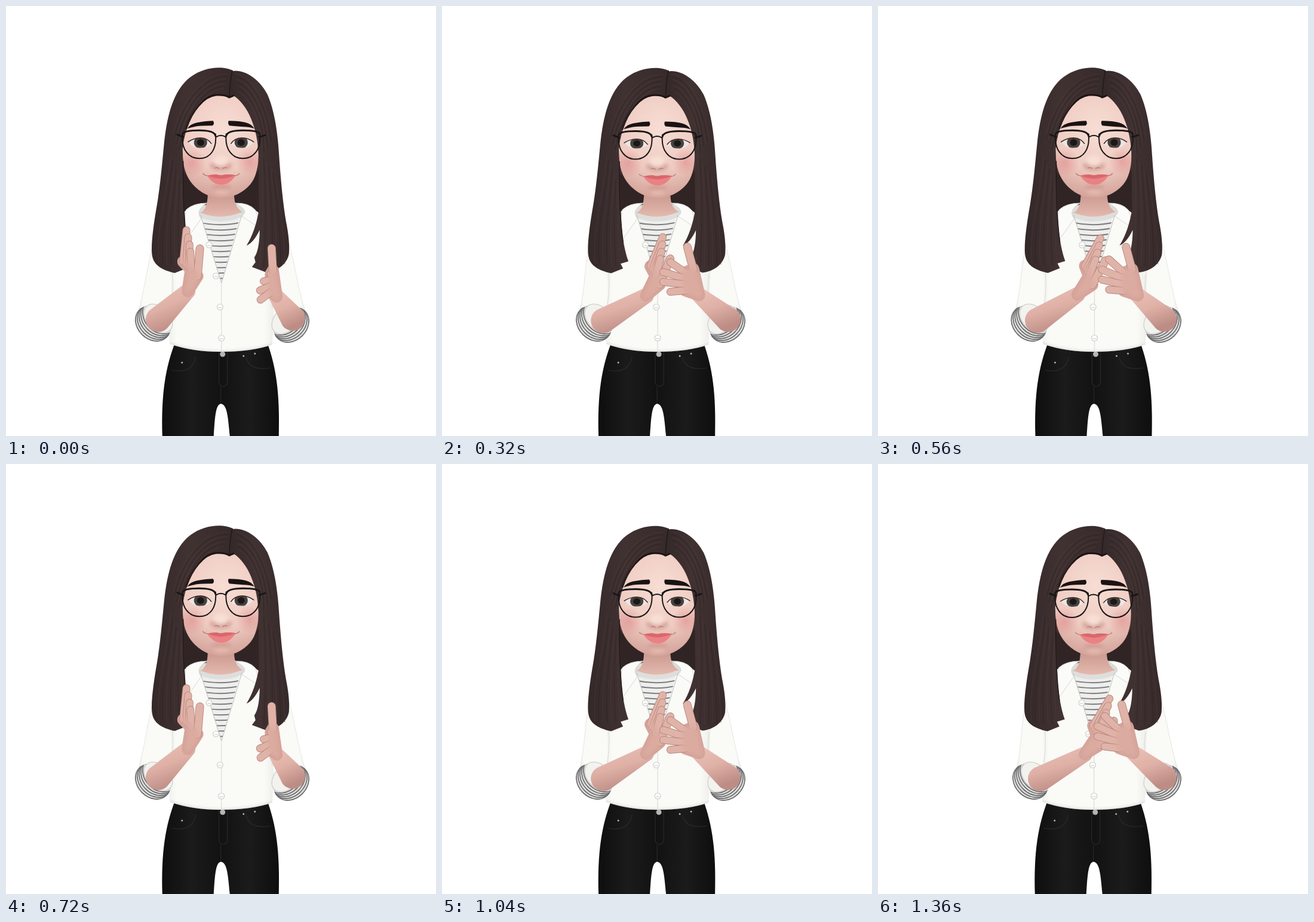
An HTML page that plays this animation: 720x720 px, repeating every 1.44 s.

```html
<!DOCTYPE html>
<html lang="en">
<head>
<meta charset="utf-8">
<title>Clapping avatar</title>
<style>
html, body { margin: 0; height: 100%; overflow: hidden; background: #fff; }
svg { display: block; width: 100vw; height: 100vh; }
.line { fill: none; stroke-linecap: round; stroke-linejoin: round; }
</style>
</head>
<body>
<svg viewBox="0 0 720 720">
  <defs>
    <linearGradient id="skin" x1="0" y1="0" x2=".4" y2="1">
      <stop offset="0" stop-color="#ecc5ba"/><stop offset=".55" stop-color="#dfb0a6"/><stop offset="1" stop-color="#bd8d85"/>
    </linearGradient>
    <radialGradient id="face" gradientUnits="userSpaceOnUse" cx="364" cy="205" r="124">
      <stop offset="0" stop-color="#f7ddd4"/><stop offset=".55" stop-color="#efccc2"/><stop offset="1" stop-color="#cf9c93"/>
    </radialGradient>
    <radialGradient id="blush">
      <stop offset="0" stop-color="#e08a8b" stop-opacity=".6"/><stop offset="1" stop-color="#e08a8b" stop-opacity="0"/>
    </radialGradient>
    <linearGradient id="neck" x1="0" y1="0" x2="0" y2="1">
      <stop offset=".3" stop-color="#c8958c"/><stop offset="1" stop-color="#e6bcb1"/>
    </linearGradient>
    <linearGradient id="cloth">
      <stop offset="0" stop-color="#e9e9e6"/><stop offset=".12" stop-color="#fafaf7"/><stop offset=".85" stop-color="#fafaf7"/><stop offset="1" stop-color="#e4e4e1"/>
    </linearGradient>
    <linearGradient id="hair">
      <stop offset="0" stop-color="#342828"/><stop offset=".45" stop-color="#413232"/><stop offset="1" stop-color="#372a2a"/>
    </linearGradient>
    <linearGradient id="denim">
      <stop offset="0" stop-color="#0e0e0f"/><stop offset=".25" stop-color="#1b1b1c"/><stop offset=".5" stop-color="#121213"/><stop offset=".75" stop-color="#1b1b1c"/><stop offset="1" stop-color="#0e0e0f"/>
    </linearGradient>
    <filter id="soft" x="-50%" y="-50%" width="200%" height="200%"><feGaussianBlur stdDeviation="3"/></filter>
    <clipPath id="vee"><path d="M325 348Q358 360 394 346L361 464Z"/></clipPath>
    <clipPath id="eyes"><path d="M306 227Q314 220 326 219.500Q338 220 344 231Q338 238 324 238Q311 237 306 227M414 227Q407 220 395 219.500Q383 220 377 231Q383 238 397 238Q410 237 414 227"/></clipPath>
    <clipPath id="band"><ellipse rx="33" ry="27" transform="rotate(45)"/></clipPath>
    <clipPath id="torsoClip"><path id="torso" d="M304 340L262 375C270 420 280 450 276 495C273 530 271 550 275 566Q312 579 360 579Q412 579 446 567C449 540 447 500 449 450L462 375L415 340Z"/></clipPath>
  </defs>

  <g id="body">
    <path fill="url(#denim)" d="M284 562H437C453 605 459 650 457 720H375C372 690 371 667 360 666C351 667 350 690 348 720H262C260 650 267 605 284 562Z"/>
    <g class="line" stroke="#29292b" stroke-width="1.2">
      <path d="M357 580V632Q364 642 371 632V580M278 610Q312 616 318 588M443 606Q408 612 402 588M360 638V664"/>
    </g>
    <g fill="#b5b5b5"><circle cx="363" cy="583" r="4.500"/><circle cx="295" cy="597" r="1.500"/><circle cx="398" cy="586" r="1.500"/><circle cx="417" cy="582" r="1.500"/></g>
    <path fill="#302424" d="M296 240H426V370H296Z"/>
    <g fill="url(#cloth)" stroke="#e6e6e3"><path id="sleeveL"/><path id="sleeveR"/></g>
    <use href="#torso" fill="url(#cloth)"/>
    <g clip-path="url(#torsoClip)" class="line" stroke="#c4c4c0">
      <path filter="url(#soft)" stroke-width="7" d="M272 569Q312 583 360 583Q412 583 450 570"/>
      <path stroke="#dededb" stroke-width="1.300" d="M361 466V578M277 500Q281 470 279 446M446 505Q444 475 447 450"/>
    </g>
    <path fill="#dcdcd9" d="M318 342Q334 328 360 332Q390 328 406 340L396 352H324Z"/>
    <path fill="url(#neck)" d="M338 292H383C381 325 382 335 396 345Q360 366 325 347C338 340 339 325 338 292Z"/>
    <g clip-path="url(#vee)"><path fill="#eeeeec" d="M320 356H400V470H320Z"/><g id="tee" class="line" stroke="#7d7d82" stroke-width="2"/></g>
    <path class="line" stroke="#dededc" stroke-width="8" d="M328 351Q360 363 393 350"/>
    <path class="line" stroke="#c9c9c6" stroke-width="1.200" d="M326 350L361 464L395 350"/>
    <g fill="#fbfbf9" stroke="#d6d6d2" stroke-linejoin="round">
      <path d="M337 330Q314 330 302 341Q296 365 303 390L327 356Q316 342 337 330Z"/>
      <path d="M383 330Q407 329 418 342Q424 360 425 372L395 352Q409 342 383 330Z"/>
    </g>
    <g id="buttons" stroke="#cfcfcb" stroke-width="1.200" fill="#fff"/>

    <path fill="url(#face)" d="M296 225C294 268 301 287 317 303C332 317 346 321 360 321C379 321 396 314 409 299C423 282 425 255 422 215C418 170 395 145 365 144C330 145 300 175 296 225Z"/>
    <g id="features">
      <circle cx="312" cy="262" r="24" fill="url(#blush)"/><circle cx="408" cy="260" r="23" fill="url(#blush)"/>
      <path fill="#1a1313" d="M304 205Q309 197 320 195Q336 192 347 192Q350 197 346 200Q330 200 320 201Q310 203 304 205ZM373 192Q392 192 402 195Q411 197 416 205Q408 202 398 202Q384 201 374 200Q371 196 373 192Z"/>
      <g id="lids">
        <g clip-path="url(#eyes)">
          <path fill="#ece6e3" d="M300 214H420V242H300Z"/>
          <g fill="#474140"><circle cx="326" cy="228" r="11"/><circle cx="394" cy="228" r="11"/></g>
          <g fill="#1c1818"><circle cx="326" cy="228" r="6"/><circle cx="394" cy="228" r="6"/></g>
        </g>
        <path class="line" stroke="#3a2928" stroke-width="1.600" d="M305 227Q314 220 326 219.500Q338 220 344 230M415 227Q407 220 395 219.500Q383 220 377 230"/>
      </g>
      <g filter="url(#soft)">
        <ellipse cx="360" cy="267" rx="18" ry="8" fill="#c07f75" opacity=".6"/>
        <ellipse cx="360" cy="259" rx="13" ry="9" fill="#f8dfd6"/>
        <ellipse cx="361" cy="303" rx="17" ry="4" fill="#c98c82" opacity=".6"/>
        <ellipse cx="361" cy="311" rx="12" ry="4" fill="#ecc3b8" opacity=".7"/>
      </g>
      <path class="line" stroke="#bd8077" stroke-width="1.400" d="M350 271Q354 269 357 272M363 272Q366 269 370 271"/>
      <path fill="#ea8184" d="M337 284Q348 282 354 283Q360 286 366 283Q375 282 385 283Q375 299 361 299Q347 299 337 284Z"/>
      <path fill="#d9676b" d="M337 284Q348 281 354 282Q360 284 366 282Q375 281 385 283Q373 288 360 289Q348 288 337 284Z"/>
      <path class="line" stroke="#b4756c" stroke-width="1.200" d="M330 280Q332 283 338 284M384 284Q389 283 391 280"/>
    </g>

    <g id="hairFront">
      <g fill="url(#hair)">
        <path d="M380 108C364 100 333 101 309 119C280 141 270 184 265 230C260 282 257 312 251 345C245 382 243 405 245 418C248 436 265 443 283 447L303 439L299 431L312 427C304 405 299 370 299 335L296 240C300 195 325 152 352 149Q366 148 374 153Z"/>
        <path d="M378 109C400 105 425 123 438 148C451 178 456 218 458 258C461 298 464 330 469 360C474 385 475 400 474 415C471 432 455 444 436 446L412 437L418 429L416 421C423 412 425 390 425 375Q415 396 403 401Q418 377 424 340L423 250C422 205 405 165 381 150L373 153Z"/>
      </g>
      <path class="line" stroke="#1d1414" stroke-width="3" d="M302 205C311 177 331 151 352 149Q368 148 374 153L381 150"/>
      <path class="line" stroke="#211818" stroke-width="1.400" d="M379 108Q375 128 374 152M297 260Q296 340 303 395"/>
      <g id="strands" class="line" stroke-width="1.200"/>
    </g>
    <g id="glasses" class="line" stroke="#181617" stroke-width="2">
      <path d="M296 214C293 241 307 255 324 255S354 241 351 214M369 214C366 241 380 255 397 255S428 241 425 214M352 219Q360 214 368 219"/>
      <path stroke-width="3" d="M287 215L297 219M434 216L424 219M296 214Q298 208 324 208Q349 208 351 217M369 217Q371 208 397 208Q423 208 425 214"/>
    </g>
  </g>
  <g id="armL"></g>
  <g id="armR"></g>
</svg>
<script>
const CLAP = 360, STEP = 80, FINGERS = [0, 1, 2, 3];
const $ = id => document.getElementById(id);
const repeat = (n, draw) => Array.from({ length: n }, (_, i) => draw(i)).join('');
const set = (id, name, value) => $(id).setAttribute(name, value);
const mix = (a, b, k) => a + (b - a) * k;
const mixPoint = (a, b, k) => a.map((v, j) => mix(v, b[j], k));
const wave = (t, peak) => Math.cos((t - peak) / CLAP * 2 * Math.PI);
const ease = (t, from, to) => {
  const s = Math.min(1, Math.max(0, (t - from) / (to - from)));
  return s * s * (3 - 2 * s);
};

// 1 = hands wide apart, 0 = palms together; opening is faster than closing.
function openness(t) {
  const p = (t - 50 + CLAP) % CLAP;
  return 1 - ease(p, 0, 200) + ease(p, 255, CLAP);
}

// Fingers point up from the wrist, each one shorter than the last.
function leftHand([x, y], open) {
  const tilt = mix(.47, -.08, open);
  const at = (turn, length) => [x + Math.sin(tilt + turn) * length, y - Math.cos(tilt + turn) * length];
  return {
    knuckles: FINGERS.map(i => at(.1 * i - .18, 50 - 4 * i)),
    tips: FINGERS.map(i => at(.03 * i - .05, 102 - 12 * i)),
    thumb: [at(.55, 30), at(.25, 74)]
  };
}

// Fingers reach inwards when closed and fan outwards when open.
function rightHand([x, y], open) {
  const turn = open ** 4, reach = mix(-62, 26, turn);
  return {
    knuckles: FINGERS.map(i => [x + reach * .38, y - 38 + 10 * i]),
    tips: FINGERS.map(i => [
      x + reach + mix(6 * (i - 1.5) ** 2, 15 * (1.5 - i), turn),
      y - 62 + 26 * open + (17 - 2 * open) * i]),
    thumb: [[x - 10 + 9 * turn, y - 44], [x - 20 + 28 * turn, y - 81]]
  };
}

const cuff = (x, y, side) => `<g transform="translate(${x} ${y}) scale(${side} 1)">
  <g clip-path="url(#band)"><path fill="#dededb" d="M-40 -40H40V40H-40Z"/>
  <g fill="none" stroke="#66666a" stroke-width="1.6">${repeat(5, i =>
    `<ellipse rx="33" ry="27" transform="translate(${1 + 3 * i} ${-1 - 3 * i}) rotate(45)"/>`)}</g></g>
  <ellipse rx="28" ry="19" fill="#f2f2ef" stroke="#c8c8c4" transform="translate(9 -9) rotate(45)"/></g>`;

function forearm([ex, ey], [wx, wy]) {
  const a = Math.atan2(wy - ey, wx - ex), nx = -Math.sin(a), ny = Math.cos(a), R = 21, r = 13;
  return `<path fill="url(#skin)" d="M${ex + nx * R} ${ey + ny * R}L${wx + nx * r} ${wy + ny * r}
    A${r} ${r} 0 0 0 ${wx - nx * r} ${wy - ny * r}L${ex - nx * R} ${ey - ny * R}A${R} ${R} 0 0 0 ${ex + nx * R} ${ey + ny * R}"/>`;
}

const finger = (a, b, w) => [['#b7847c', w], ['#e0b3a8', w - 1.8]].map(([color, width]) =>
  `<path class="line" stroke="${color}" stroke-width="${width}" d="M${a}L${b}"/>`).join('');

function drawArm(id, cuffShape, elbow, wrist, { knuckles, tips, thumb }) {
  const palm = `M${wrist}L${thumb[0]}L${knuckles[0]}L${knuckles[3]}Z`;
  const skin = (color, width) => `<path d="${palm}" class="line" style="fill:${color}" stroke="${color}" stroke-width="${width}"`;
  $(id).innerHTML = cuffShape + forearm(elbow, wrist) + skin('#d5a399', 20) + '/>'
    + tips.map((tip, i) => finger(knuckles[i], tip, 13)).join('') + finger(...thumb, 14)
    + skin('#dbaba0', 9) + ' filter="url(#soft)"/>';
}

function draw(t) {
  const open = openness(t), lead = openness(t + 20);
  const nod = -2 * wave(t, 100);
  set('body', 'transform', `translate(${.6 - .9 * wave(t, 20)} 0)`);
  set('features', 'transform', `translate(0 ${nod})`);
  set('glasses', 'transform', `translate(0 ${nod})`);
  set('hairFront', 'transform', `translate(0 ${nod * .3})`);
  set('lids', 'transform', `translate(0 ${229 + nod * .2}) scale(1 ${.93 - nod * .04}) translate(0 -229)`);

  const elbowL = mixPoint([272, 527], [240, 523], open), wristL = mixPoint([346, 486], [268, 470], open);
  const elbowR = mixPoint([479, 525], [481, 521], open), wristR = mixPoint([428, 484], [475, 489], open);
  const l = mix(255, 238, open), r = 478;
  drawArm('armL', cuff(l, 532, 1), elbowL, wristL, leftHand(wristL, lead));
  drawArm('armR', cuff(r, 534, -1), elbowR, wristR, rightHand(wristR, lead));
  set('sleeveL', 'd', `M250 385C237 430 ${l - 13} 475 ${l - 25} 514L${l + 26} 552L292 450Z`);
  set('sleeveR', 'd', `M470 385C485 430 ${r + 10} 475 ${r + 25} 516L${r - 27} 552L440 450Z`);
}

$('tee').innerHTML = repeat(11, i => `<path d="M322 ${362 + 9 * i}Q360 ${371 + 9 * i} 398 ${361 + 9 * i}"/>`);
$('buttons').innerHTML = repeat(4, i => {
  const x = 361 - 2.3 * (3 - i) ** 2, y = 400 + 52 * i;
  return `<circle cx="${x}" cy="${y}" r="5"/><path d="M${x - 3} ${y + 1}h6"/>`;
});
$('strands').innerHTML = repeat(7, i => `<g stroke="${i % 2 ? '#2b2020' : '#4c3c3c'}" opacity=".5">
  <path d="M${276 + 3 * i} ${250 + 8 * i}C${270 + 4 * i} 320 ${251 + 7 * i} 370 ${256 + 7 * i} ${430 + i}"/>
  <path d="M${428 + 4 * i} ${250 + 6 * i}C${432 + 4 * i} 320 ${430 + 6 * i} 370 ${425 + 7 * i} ${438 - i}"/>
  <path d="M${371 - i} ${114 + 4 * i}C${335 - i} ${112 + 5 * i} ${296 + i} ${150 + 6 * i} ${280 + 2 * i} ${215 + 5 * i}"/>
  <path d="M${384 + i} ${113 + 5 * i}C${412 - i} ${116 + 6 * i} ${437 - i} ${160 + 5 * i} ${447 - 3 * i} ${220 + 5 * i}"/></g>`);

function frame() {
  draw(Math.floor(performance.now() % (4 * CLAP) / STEP) * STEP % CLAP);
  requestAnimationFrame(frame);
}
frame();
</script>
</body>
</html>
```
